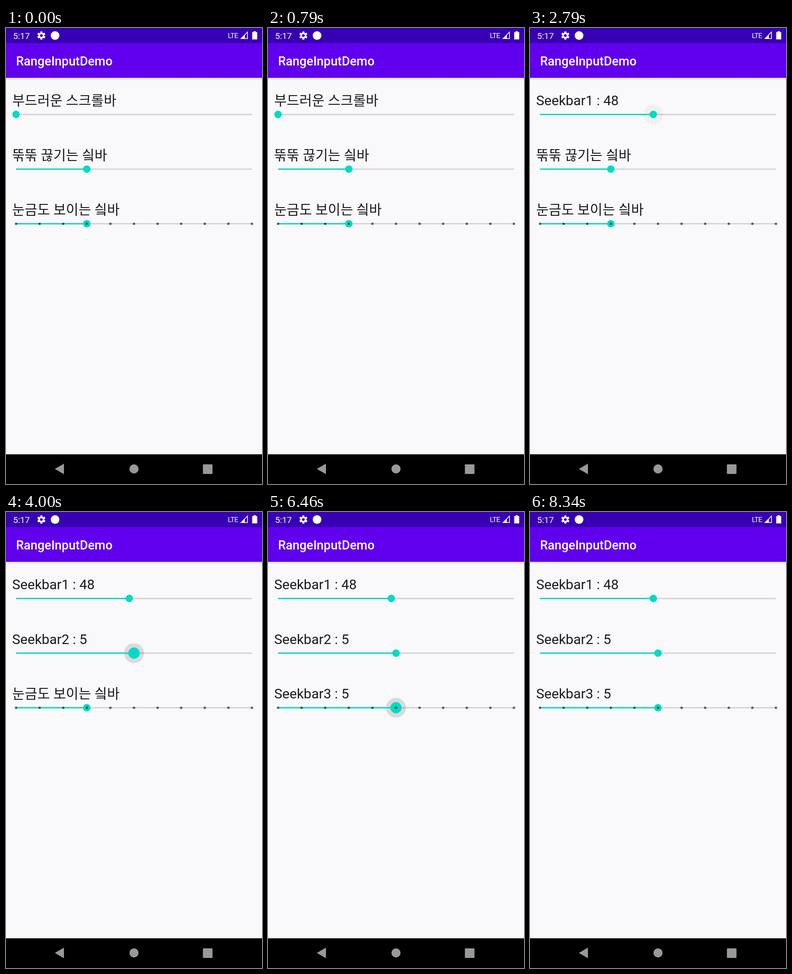
An HTML page for the animation above (8.42 s loop, 561x998 px).

```html
<!DOCTYPE html>
<html lang="ko">
<head>
<meta charset="utf-8">
<title>Sliders</title>
<style>
  html, body { margin: 0; width: 100%; height: 100%; overflow: hidden; background: #f9f9fb; }
  svg { display: block; width: 100%; height: 100%; }
  text { font-family: Roboto, "Noto Sans CJK KR", "Noto Sans CJK", sans-serif; fill: #fff; }
  .label { font-size: 30px; fill: #1b1b1d; }
  .teal { fill: #03dac5; }
</style>
</head>
<body>
<svg viewBox="0 0 561 998">
  <defs>
    <linearGradient id="shade" x2="0" y2="1">
      <stop stop-opacity=".13"/>
      <stop offset="1" stop-opacity="0"/>
    </linearGradient>
  </defs>
  <rect width="561" height="998" fill="#f9f9fb"/>
  <rect y="109" width="561" height="6" fill="url(#shade)"/>
  <rect y="32" width="561" height="77" fill="#6000ec"/>
  <rect width="561" height="33" fill="#3700b3"/>
  <text x="22" y="81.5" font-size="27.3" font-weight="500">RangeInputDemo</text>

  <!-- status bar -->
  <text x="15.5" y="23.5" font-size="19.1">5:17</text>
  <g id="gear" transform="translate(77.5 16.5)" stroke="#fff" fill="none">
    <circle r="4.8" stroke-width="3.6"/>
  </g>
  <circle cx="107.5" cy="16.5" r="9.5" fill="#fff"/>
  <text x="486.3" y="22" font-size="15.5" letter-spacing="-.8">LTE</text>
  <path d="M515 23.3 529.2 9V23.3Z" fill="none" stroke="#fff" stroke-width="1.6"/>
  <path d="M514 24 523.5 14.5V24Z" fill="#fff"/>
  <path d="M542.5 7h5v2h3v16h-11v-16h3Z" fill="#fff"/>

  <g id="bars"></g>

  <!-- navigation bar -->
  <rect y="933" width="561" height="65"/>
  <g fill="#999997">
    <path d="M107 965 127 953.5V976.5Z"/>
    <circle cx="280.5" cy="965" r="10"/>
    <rect x="431.5" y="955" width="21" height="21" rx="1.5"/>
  </g>
</svg>
<script>
const LOOP = 8420, LEFT = 22, SPAN = 517;

// keys: [time, value]; the value eases between keys and is rounded down to a whole step
const sliders = [
  { y: 189.3, title: "부드러운 스크롤바", max: 100, press: 980, release: 2580,
    keys: [[1080, 0], [1710, 41.3], [2250, 48.3]] },
  { y: 308.9, title: "뚞뚞 끊기는 싘바", max: 10, press: 3350, release: 4460,
    keys: [[3450, 3.2], [3900, 5.2]] },
  { y: 428.4, title: "눈금도 보이는 싘바", max: 10, press: 5200, release: 6790, ticks: true,
    keys: [[5300, 3.2], [6050, 5.2]] },
];

const clamp = v => Math.min(1, Math.max(0, v));
const smooth = v => v * v * (3 - 2 * v);

function add(parent, tag, attrs) {
  const node = document.createElementNS("http://www.w3.org/2000/svg", tag);
  for (const name in attrs) node.setAttribute(name, attrs[name]);
  return parent.appendChild(node);
}

function valueAt(keys, t) {
  let value = keys[0][1];
  for (let i = 1; i < keys.length; i++) {
    const [t0, v0] = keys[i - 1], [t1, v1] = keys[i];
    value += (v1 - v0) * smooth(clamp((t - t0) / (t1 - t0)));
  }
  return Math.floor(value);
}

function build(slider) {
  const { y } = slider, bars = document.getElementById("bars");
  slider.label = add(bars, "text", { class: "label", x: 13.5, y: y - 20.3 });
  slider.ripple = add(bars, "circle", { cy: y, r: 21.7 });
  add(bars, "rect", { x: LEFT, y: y - 1.4, width: SPAN, height: 2.8, "fill-opacity": .16 });
  slider.fill = add(bars, "rect", { class: "teal", x: LEFT, y: y - 1.4, height: 2.8 });
  slider.thumb = add(bars, "circle", { class: "teal", cy: y });
  if (slider.ticks)
    for (let i = 0; i <= slider.max; i++)
      add(bars, "circle", { cx: LEFT + SPAN * i / slider.max, cy: y, r: 2.7, "fill-opacity": .58 });
}

function update(slider, index, t) {
  const { keys, max, press, release } = slider;
  const value = valueAt(keys, t);
  const x = LEFT + SPAN * value / max;
  const grow = smooth(clamp((t - press) / 150)) - smooth(clamp((t - release) / 150));
  const glow = clamp((t - press) / 120) * (1 - clamp((t - release) / 290));
  const touched = value !== Math.floor(keys[0][1]);
  const text = touched ? `Seekbar${index + 1} : ${value}` : slider.title;
  if (slider.label.textContent !== text) slider.label.textContent = text;
  slider.fill.setAttribute("width", x - LEFT);
  slider.thumb.setAttribute("cx", x);
  slider.thumb.setAttribute("r", 8.2 + 4.1 * grow);
  slider.ripple.setAttribute("cx", x);
  slider.ripple.setAttribute("fill-opacity", .125 * glow);
}

for (let i = 0; i < 6; i++)
  add(document.getElementById("gear"), "path",
    { d: "M0-5.5V-9", "stroke-width": 4.4, transform: `rotate(${i * 60})` });
sliders.forEach(build);

const start = performance.now();
function frame() {
  const t = (performance.now() - start) % LOOP;
  sliders.forEach((slider, i) => update(slider, i, t));
  requestAnimationFrame(frame);
}
frame();
</script>
</body>
</html>
```
